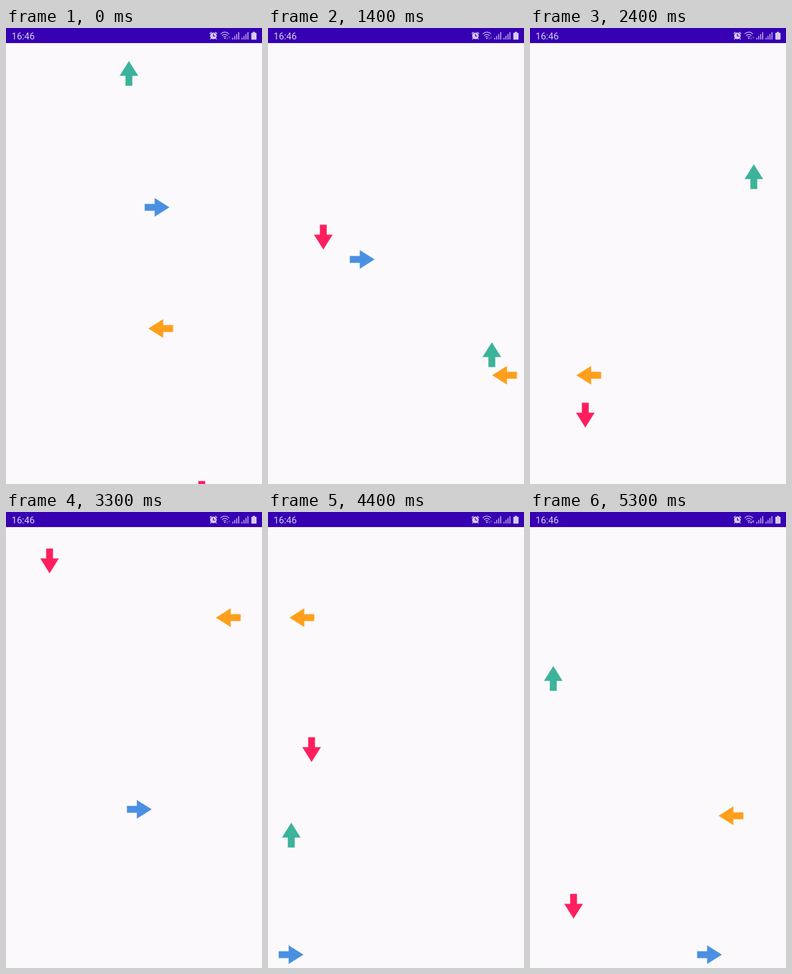
An HTML page that plays this animation: 561 px wide and 998 px high, repeating every 5400 ms.

```html
<!DOCTYPE html>
<html lang="en">
<head>
<meta charset="utf-8">
<title>Arrows</title>
<style>
html, body { margin: 0; width: 100%; height: 100%; overflow: hidden; background: #fbf9fb; }
svg { display: block; width: 561px; height: 998px; }
text { font: 20.4px Roboto, sans-serif; }
</style>
</head>
<body>
<svg viewBox="0 0 561 998">
  <rect width="561" height="998" fill="#fbf9fb"/>
  <g id="arrows"></g>
  <rect width="561" height="33" fill="#3700b3"/>
  <g fill="#d7cbf0">
    <text x="12.2" y="25">16:46</text>
    <circle cx="454.5" cy="17.3" r="7.2"/>
    <path d="M446.4 12.6l4-3.6M462.6 12.6l-4-3.6M449.6 22.4l-2 2.4M459.4 22.4l2 2.4" stroke="#d7cbf0" stroke-width="1.8"/>
    <path d="M454.5 12.6v5.2h4.2" fill="none" stroke="#3700b3" stroke-width="1.6"/>
    <path d="M470.4 13.2q9.2-8.2 18.4 0M473.4 16.6q6.2-5.4 12.4 0M476.4 19.8q3.2-2.8 6.4 0" fill="none" stroke="#d7cbf0" stroke-width="1.4"/>
    <circle cx="479.6" cy="22.4" r="1.5"/>
    <path id="data" d="M484.5 19.5v5m-2-2l2 2 2-2M489.2 24v-5m-2 2l2-2 2 2" fill="none" stroke-width="1.1"/>
    <g id="bars"></g>
    <path d="M541 8.6h4.5v1.9h2.3q1.2 0 1.2 1.2v12.6q0 1.2-1.2 1.2h-9q-1.2 0-1.2-1.2v-12.6q0-1.2 1.2-1.2h2.2z"/>
  </g>
</svg>
<script>
const NS = "http://www.w3.org/2000/svg";
const LOOP = 5400, FRAME = 100;
const STEP = 7.792;            // pixels per movement step
const STEPS_PER_FRAME = 5;
const STALLS = [200, 500, 3500, 3800, 5100];  // times at which one step is dropped
const SIZE = 54.4;             // arrow length

// Each arrow crosses the stage and re-enters in its next lane.
// from: entry edge, phase: steps already made, lanes: centre line of each lap
const movers = [
  { color: "#3cb39b", edge: "#7bcab9", axis: "y", dir: -1, from: 999.4, phase: 119, lanes: [269.4, 490.5, 51] },
  { color: "#4a90e2", edge: "#82b2eb", axis: "x", dir: 1, from: 0, phase: 39, lanes: [392.5, 506.5, 650.7, 968.8] },
  { color: "#ff9f1c", edge: "#ffbd62", axis: "x", dir: -1, from: 561.2, phase: 32, lanes: [657.7, 760, 231.2, 664.8] },
  { color: "#ff1f5e", edge: "#ff6d97", axis: "y", dir: 1, from: 33.1, phase: 123, lanes: [429, 121.2, 95.5] }
];

function add(parent, tag, attrs) {
  const el = document.createElementNS(NS, tag);
  for (const key in attrs) el.setAttribute(key, attrs[key]);
  return parent.appendChild(el);
}

const layer = document.getElementById("arrows");
for (const m of movers) {
  // Backward movers must also travel their own length
  m.lap = (m.axis === "x" ? 84 : 140) + (m.dir < 0 ? Math.round(SIZE / STEP) : 0);
  m.turn = m.axis === "x" ? m.dir * 90 : m.dir * 90 + 90;
  m.el = add(layer, "path", {
    d: "M0-26.9L20.2 5.2H7.4V27H-7.4V5.2H-20.2Z",
    fill: m.color, stroke: m.edge, "stroke-width": 0.8
  });
}

const bars = document.getElementById("bars");
for (const left of [496.2, 516.4])
  for (let i = 0; i < 4; i++)
    add(bars, "rect", { x: left + i * 4.3, y: 21.4 - i * 4.1, width: 1.8, height: 3.8 + i * 4.1 });

const data = document.getElementById("data");

function draw(t) {
  const steps = t / FRAME * STEPS_PER_FRAME - STALLS.filter(s => s <= t).length;
  for (const m of movers) {
    const total = steps + m.phase;
    const lane = m.lanes[Math.floor(total / m.lap)];
    const along = m.from + SIZE / 2 + m.dir * (total % m.lap) * STEP;
    const [x, y] = m.axis === "x" ? [along, lane] : [lane, along];
    m.el.setAttribute("transform", `translate(${x.toFixed(2)} ${y.toFixed(2)}) rotate(${m.turn})`);
  }
  data.setAttribute("stroke", t >= 5100 ? "#d7cbf0" : "#7650c9");
}

const begin = performance.now();
function tick() {
  const t = (performance.now() - begin) % LOOP;
  draw(Math.floor(t / FRAME) * FRAME);
  requestAnimationFrame(tick);
}
draw(0);
requestAnimationFrame(tick);
</script>
</body>
</html>
```
